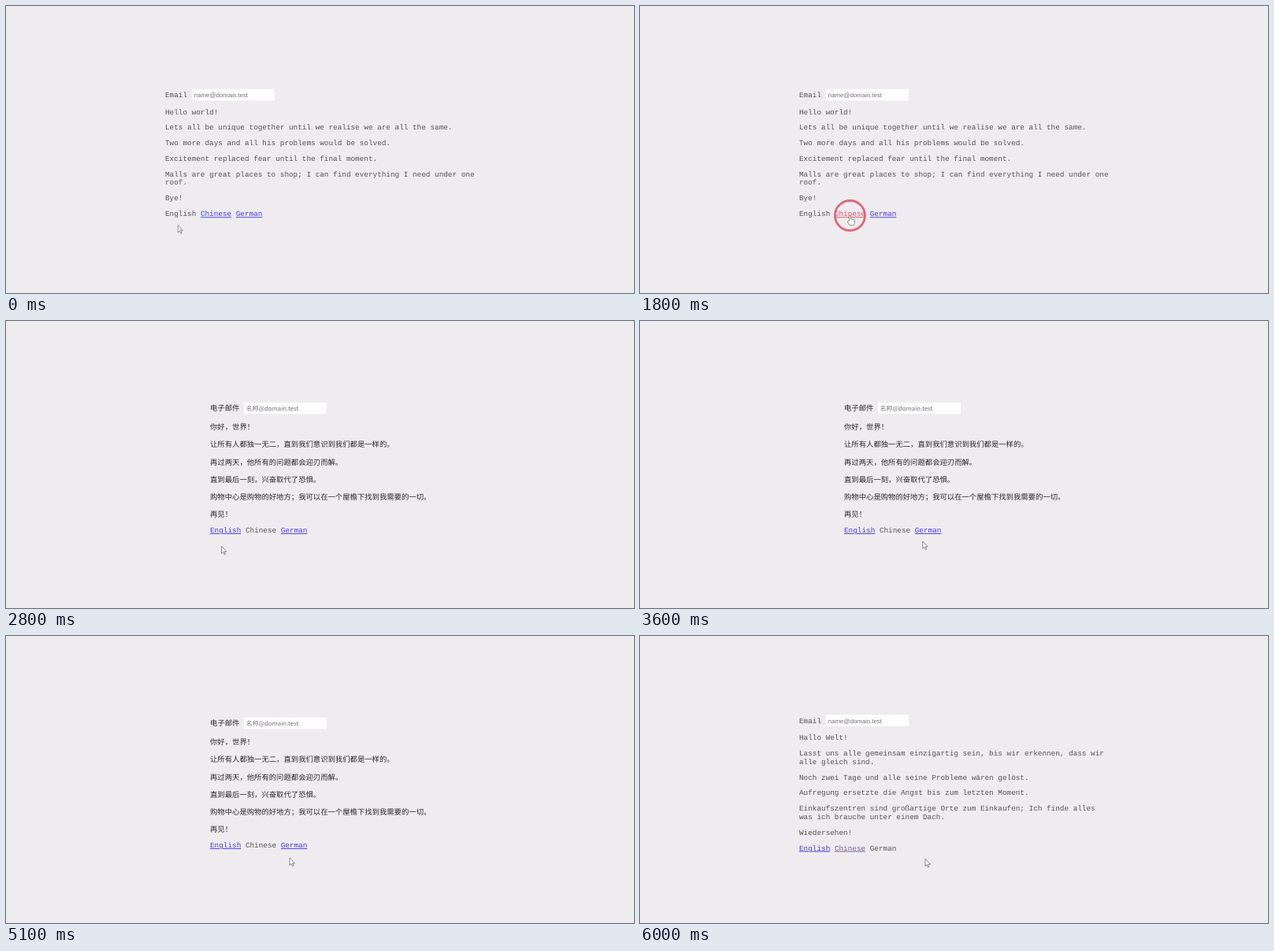
Animation of 797 by 365 pixels, one loop 6600 ms. Source, as an HTML page:

```html
<!DOCTYPE html>
<html lang="en">
<head>
<meta charset="utf-8">
<title>Language switcher</title>
<style>
  html, body { margin: 0; width: 100%; height: 100%; overflow: hidden; background: #eeecee; }
  svg { display: block; }
  text { font: 9.36px "Liberation Mono", monospace; fill: #555; text-rendering: geometricPrecision; }
  .zh { font-family: "Noto Sans CJK SC", "Noto Sans CJK", sans-serif; fill: #2a2a2a; }
  .hint { font: 7.85px "Liberation Sans", sans-serif; fill: #757575; }
  .hint.zh { font-family: "Noto Sans CJK SC", "Noto Sans CJK", sans-serif; }
  .link { fill: #4a3fe0; text-decoration: underline; text-decoration-thickness: .8px; text-underline-offset: .6px; }
  .visited { fill: #82629f; }
  .active { fill: #e0566a; }
  #cursor path { fill: #fbfafb; stroke: #6c6c6c; stroke-width: .75; stroke-linejoin: round; }
  #ring { fill: none; stroke: #e2687b; stroke-width: 2.8; }
</style>
</head>
<body>
<svg width="797" height="365" viewBox="0 0 797 365">
  <g id="pages"></g>
  <circle id="ring"/>
  <g id="cursor">
    <path id="arrow" d="M0 0V9.5L2.1 7.5 3.5 10.8 4.9 10.2 3.5 7H6.4Z"/>
    <path id="hand" d="M-1 7V.8a1 1 0 0 1 2 0V4.6l4 .9q1 .3 1 1.4V9.4L4.4 12.6H-.2L-3 8.6q-.6-1.4 .6-1.4Z"/>
  </g>
</svg>
<script>
const LOOP = 6600, STEP = 100;
const $ = id => document.getElementById(id);

// Lines are [baseline, text]; the first one is the label of the email field.
const pages = [
  { start: 0, x: 202, field: [236, 105.7], hint: 'name@domain.test', current: 'English', linkY: 267.3, lines: [
    [116, 'Email'],
    [137.5, 'Hello world!'],
    [157.4, 'Lets all be unique together until we realise we are all the same.'],
    [177.3, 'Two more days and all his problems would be solved.'],
    [197.2, 'Excitement replaced fear until the final moment.'],
    [217, 'Malls are great places to shop; I can find everything I need under one'],
    [227.4, 'roof.'],
    [247.3, 'Bye!']] },
  { start: 2300, x: 259, field: [302, 103.7], hint: '名称@domain.test', current: 'Chinese', linkY: 269, style: 'zh', lines: [
    [114.2, '电子邮件'],
    [138.2, '你好，世界！'],
    [160.4, '让所有人都独一无二，直到我们意识到我们都是一样的。'],
    [182.6, '再过两天，他所有的问题都会迎刃而解。'],
    [204.8, '直到最后一刻，兴奋取代了恐惧。'],
    [227, '购物中心是购物的好地方；我可以在一个屋檐下找到我需要的一切。'],
    [249.2, '再见！']] },
  { start: 5200, x: 202, field: [236, 100.2], hint: 'name@domain.test', current: 'German', linkY: 272.6, visited: 'Chinese', lines: [
    [110.7, 'Email'],
    [132.2, 'Hallo Welt!'],
    [152.1, 'Lasst uns alle gemeinsam einzigartig sein, bis wir erkennen, dass wir'],
    [162.6, 'alle gleich sind.'],
    [182.5, 'Noch zwei Tage und alle seine Probleme wären gelöst.'],
    [202.4, 'Aufregung ersetzte die Angst bis zum letzten Moment.'],
    [222.3, 'Einkaufszentren sind großartige Orte zum Einkaufen; Ich finde alles'],
    [232.8, 'was ich brauche unter einem Dach.'],
    [252.7, 'Wiedersehen!']] },
];

const clicks = [
  { start: 1700, x: 266.5, y: 266.5, page: 0, link: 'Chinese' },
  { start: 4500, x: 363, y: 268, page: 1, link: 'German' },
];

// Cursor stops: [time, x, y]
const path = [
  [0, 218.2, 278.5], [600, 218.2, 278.5], [800, 225, 283], [900, 236, 286], [1000, 250, 286],
  [1100, 261.5, 283.2], [1300, 267, 274], [1500, 266.5, 266.3], [2200, 266.5, 266.3],
  [2300, 266.5, 268.3], [2500, 268, 280], [2800, 273.5, 286.3], [3000, 273.5, 286.3],
  [3300, 310, 285], [3600, 358.8, 280], [3700, 360, 280], [4000, 363, 269], [4300, 363, 268],
  [4700, 363, 268], [5000, 361, 279], [5100, 360, 282], [5500, 362, 283.3], [LOOP, 362, 283.3],
];

const text = (x, y, content, style = '') => `<text x="${x}" y="${y}" class="${style}">${content}</text>`;

function linkRow(page) {
  return ['English', 'Chinese', 'German'].map(name => {
    const style = name === page.current ? '' : name === page.visited ? 'link visited' : 'link';
    return `<tspan class="${style}" data-name="${name}">${name}</tspan>`;
  }).join(' ');
}

$('pages').innerHTML = pages.map(page => {
  const [fx, fy] = page.field;
  return `<g><rect x="${fx}" y="${fy}" width="105" height="14.5" fill="#fefdff"/>` +
    text(fx + 2.8, page.lines[0][0], page.hint, `hint ${page.style || ''}`) +
    page.lines.map(([y, line]) => text(page.x, y, line, page.style)).join('') +
    text(page.x, page.linkY, linkRow(page)) + '</g>';
}).join('');
const groups = [...$('pages').children];
for (const click of clicks) {
  click.node = groups[click.page].querySelector(`[data-name=${click.link}]`);
}

function cursorAt(time) {
  const i = Math.max(1, path.findIndex(stop => stop[0] >= time));
  const [t0, x0, y0] = path[i - 1], [t1, x1, y1] = path[i];
  const k = (time - t0) / (t1 - t0);
  return [x0 + (x1 - x0) * k, y0 + (y1 - y0) * k];
}

const show = (node, visible) => node.setAttribute('visibility', visible ? 'visible' : 'hidden');

function draw(now) {
  const time = Math.floor(now % LOOP / STEP) * STEP;
  const current = pages.filter(page => page.start <= time).length - 1;
  groups.forEach((group, i) => show(group, i === current));

  const [x, y] = cursorAt(time);
  $('cursor').setAttribute('transform', `translate(${x} ${y})`);
  const overLink = y < 271;
  show($('hand'), overLink);
  show($('arrow'), !overLink);

  show($('ring'), false);
  for (const click of clicks) {
    const age = time - click.start;
    const pressed = age >= 0 && age < 300;
    click.node.classList.toggle('active', pressed);
    if (!pressed) continue;
    show($('ring'), true);
    $('ring').setAttribute('cx', click.x);
    $('ring').setAttribute('cy', click.y);
    $('ring').setAttribute('r', Math.min(19, 12 + age * .07));
    $('ring').setAttribute('opacity', age > 100 ? .5 : 1);
  }
  requestAnimationFrame(draw);
}
requestAnimationFrame(draw);
</script>
</body>
</html>
```
